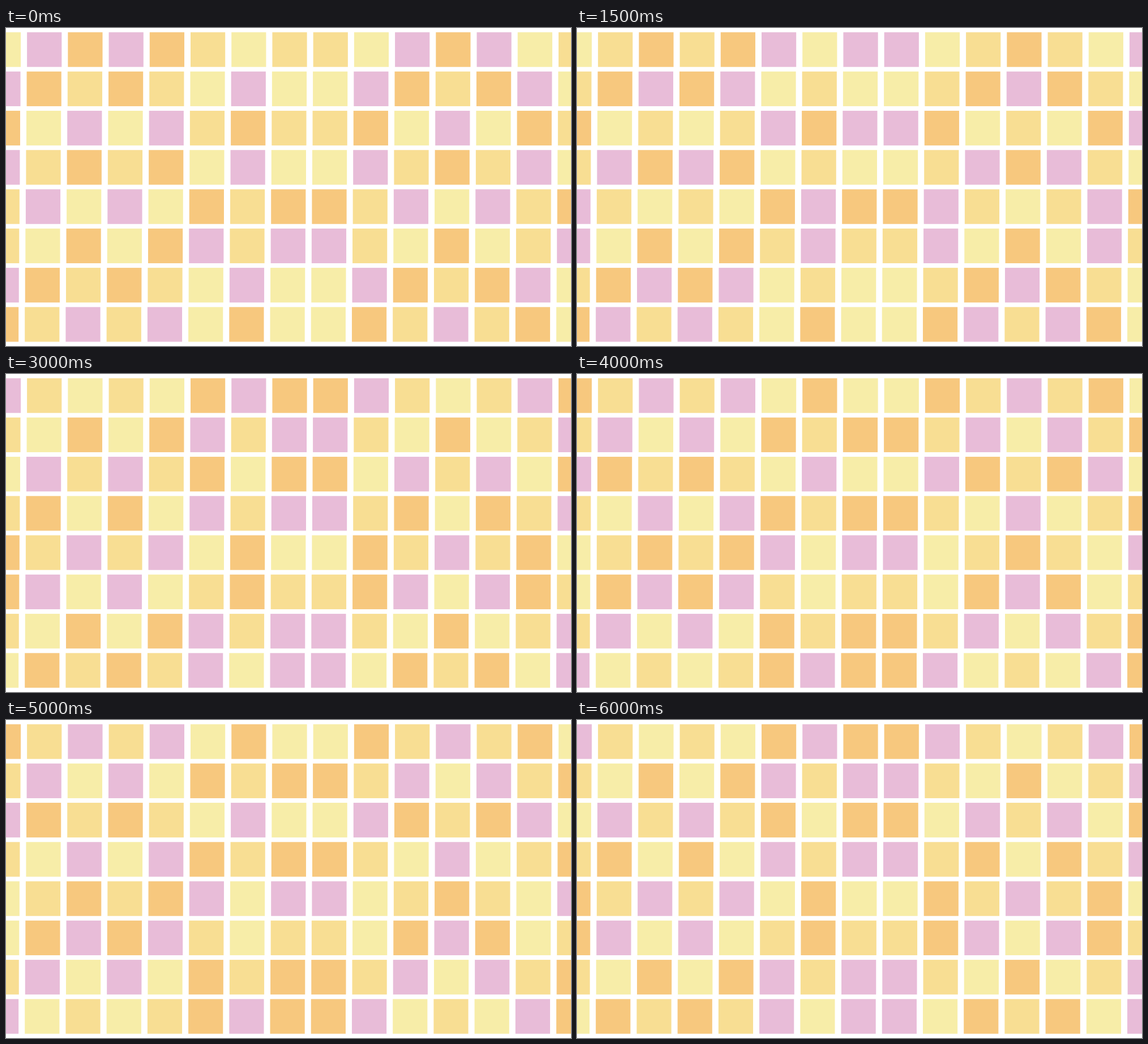
An HTML page with a canvas that plays this animation: 998 by 561 pixels, repeating every 6.5 s.

```html
<!DOCTYPE html>
<html>
<head>
<meta charset="utf-8">
<style>
  html, body { margin: 0; width: 100%; height: 100%; overflow: hidden; background: #fff; }
  canvas { display: block; }
</style>
</head>
<body>
<canvas id="stage" width="998" height="561"></canvas>
<script>
const ctx = document.getElementById('stage').getContext('2d');
const COLORS = { Y: '#f7eda8', P: '#e8bcd8', O: '#f7c87e', G: '#f8de93' };

const SLOTS = 'YPOG';
// Each column belongs to one of four groups; each row gives the groups their slots.
const COLUMN_GROUPS = '012123033012103';
const ROWS = ['YPOG', 'POGY', 'OYPG', 'PGOY', 'GPYO', 'GYOP', 'POGY', 'OGPY'];

// Colours assigned to the four slots, and the order in which they play.
const PALETTES = ['YPOG', 'GYPO', 'YGPO', 'YGOP', 'OGPY', 'PGOY', 'PGYO'];
const ORDER = [0, 1, 2, 3, 4, 5, 6, 5, 4, 3, 4, 5, 6];
const STEP = 500;

const SIZE = 61.2;
const PITCH_X = 72.22;
const PITCH_Y = 69.26;
const ROW_SHIFT = -0.56;

function draw(palette) {
  ctx.fillStyle = '#fff';
  ctx.fillRect(0, 0, 998, 561);
  ROWS.forEach((row, r) => {
    [...COLUMN_GROUPS].forEach((group, c) => {
      const slot = SLOTS.indexOf(row[group]);
      ctx.fillStyle = COLORS[palette[slot]];
      ctx.fillRect(-35.1 + c * PITCH_X + r * ROW_SHIFT, 7.5 + r * PITCH_Y, SIZE, SIZE);
    });
  });
}

const start = performance.now();
function tick() {
  const step = Math.floor((performance.now() - start) / STEP) % ORDER.length;
  draw(PALETTES[ORDER[step]]);
  requestAnimationFrame(tick);
}
tick();
</script>
</body>
</html>
```
